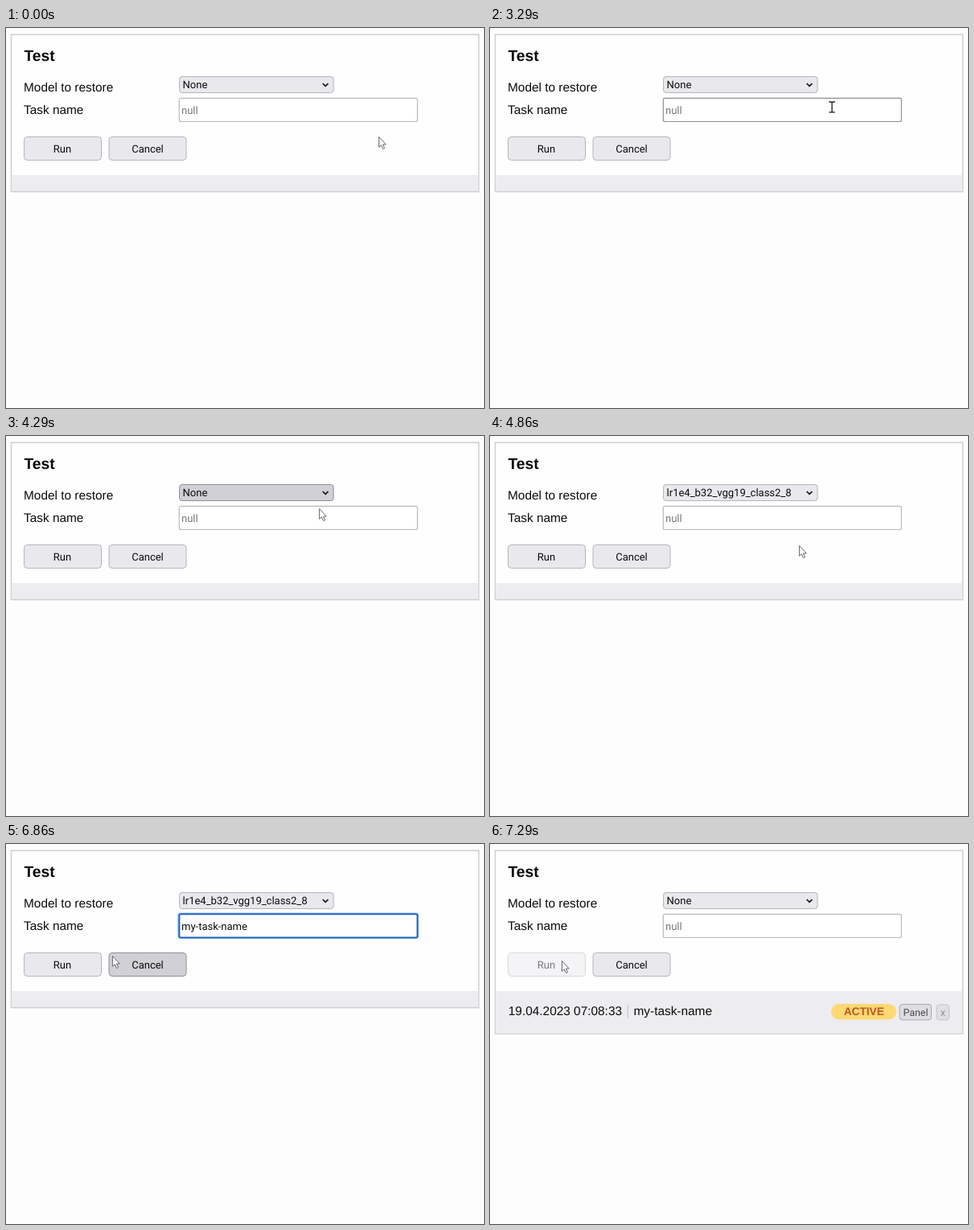
Write an HTML page that moves like this. It is 594 px wide and 473 px high and loops after 8 s.

```html
<!DOCTYPE html>
<html lang="en">
<head>
<meta charset="utf-8">
<title>Test form</title>
<style>
  html, body { margin: 0; width: 100%; height: 100%; overflow: hidden; background: #fdfdfd; }
  svg { display: block; width: 594px; height: 473px; }
  text { font: 15.4px "Liberation Sans", Arial, sans-serif; fill: #0c0c0c; text-rendering: geometricPrecision; }
  .ui { font: 13px Roboto, Tahoma, sans-serif; }
  .small { font-size: 12.4px; fill: #4a4a4e; }
  .mid { text-anchor: middle; }
  .title { font-size: 19.3px; font-weight: bold; }
  .tag { font-size: 13.7px; font-weight: bold; fill: #b9591f; }
  .control { fill: #e9e9ed; stroke: #b3b3bb; }
  .hover { fill: #d0d0d6; stroke: #8e8e98; }
  .disabled rect { fill: #f4f4f6; stroke: #d9d9de; }
  .disabled text { fill: #7b7b7f; }
</style>
</head>
<body>
<svg viewBox="0 0 594 473">
  <rect id="panel" x="6.5" y="8.2" width="581" fill="#fefefe" stroke="#cfced6" stroke-width="1.5"/>
  <rect id="footer" x="7.3" y="183" width="579.4" fill="#ededf0"/>

  <text class="title" x="22.5" y="41">Test</text>
  <text x="22" y="79">Model to restore</text>
  <text x="22" y="107">Task name</text>

  <rect id="select" class="control" x="215.5" y="60.5" width="191.5" height="20" rx="3.5"/>
  <text id="model" class="ui" x="219.6" y="75"></text>
  <path d="M393.6 69 L397 72.4 L400.4 69" fill="none" stroke="#111" stroke-width="1.7"/>

  <rect id="halo" x="212.8" y="85.3" width="300.4" height="33" rx="4" fill="#b5d2f5"/>
  <rect id="input" x="215.3" y="87.3" width="296" height="29.2" rx="2" fill="#fff"/>
  <text id="task" class="ui" x="218" y="107"></text>
  <path id="caret" d="M218.5 95 V110" stroke="#333" stroke-width="1"/>

  <g id="run">
    <rect class="control" x="22.5" y="135.5" width="96" height="29" rx="4"/>
    <text class="ui mid" x="70" y="155">Run</text>
  </g>
  <g id="cancel">
    <rect class="control" x="128" y="135.5" width="96" height="29" rx="4"/>
    <text class="ui mid" x="176" y="155">Cancel</text>
  </g>

  <g id="row">
    <text x="22.8" y="213.3">19.04.2023 07:08:33</text>
    <path d="M171.2 200 V216.5" stroke="#bdbdc2"/>
    <text x="178.5" y="213.3">my-task-name</text>
    <rect x="424" y="199" width="81" height="19.5" rx="9.75" fill="#fdd873"/>
    <text class="tag mid" x="464.8" y="213.4">ACTIVE</text>
    <rect x="509" y="199.5" width="39.5" height="19.5" rx="3.5" fill="#dedee2" stroke="#a9a9b0"/>
    <text class="ui small mid" x="529" y="214">Panel</text>
    <rect x="555" y="200" width="15.5" height="19" rx="3.5" fill="#e0e0e4" stroke="#c3c3c9"/>
    <text class="ui small mid" x="562.8" y="214" style="fill:#8f8f94">x</text>
  </g>

  <path id="arrow" d="M.4 .5 V13.4 L3.3 10.8 L5.4 15.6 L7.5 14.7 L5.4 10 H9.2 Z"
        fill="#fff" stroke="#666670" stroke-width="1"/>
  <path id="beam" d="M-3.7 -6.3 H-1 Q0 -6.3 0 -5.3 Q0 -6.3 1 -6.3 H3.7 M0 -5.5 V5.8 M-3.7 6.5 H-1 Q0 6.5 0 5.5 Q0 6.5 1 6.5 H3.7"
        fill="none" stroke="#1c1c1c" stroke-width="1.3"/>
</svg>
<script>
const LOOP = 8000;
const $ = id => document.getElementById(id);
const show = (id, on) => { $(id).style.display = on ? '' : 'none'; };

const arrow = (x, y) => ({ shape: 'arrow', x, y });
const beam = (x, y) => ({ shape: 'beam', x, y });
const MODEL = 'lr1e4_b32_vgg19_class2_8';

// Each step changes only the listed parts of the state.
const start = { at: 0, pointer: arrow(463, 135), over: '', model: 'None', task: '', focus: false, caret: false, done: false };
const steps = [
  start,
  { at: 3290, pointer: beam(425, 98.3), over: 'input' },
  { at: 3430, pointer: arrow(402, 75), over: '' },
  { at: 3710, pointer: arrow(399, 72), over: 'select' },
  { at: 3860, pointer: null },
  { at: 4000, over: '' },
  { at: 4290, pointer: arrow(389, 90), over: 'select' },
  { at: 4430, pointer: arrow(385, 103) },
  { at: 4570, pointer: arrow(381, 113) },
  { at: 4860, pointer: arrow(384, 136), over: '', model: MODEL },
  { at: 5000, pointer: beam(392, 118), over: 'input' },
  { at: 5290, pointer: beam(394, 114) },
  { at: 5430, focus: true, caret: true },
  { at: 5570, pointer: null, caret: false },
  { at: 6000, task: 'my-task-name' },
  { at: 6570, pointer: beam(394, 114) },
  { at: 6860, pointer: arrow(132, 139), over: 'cancel' },
  { at: 7000, pointer: arrow(89, 145), over: 'run' },
  { at: 7140, focus: false },
  { at: 7290, over: '', model: 'None', task: '', done: true }
];

function stateAt(t) {
  return Object.assign({}, ...steps.filter(s => s.at <= t));
}

function draw(s) {
  $('panel').setAttribute('height', s.done ? 228 : 195.5);
  $('footer').setAttribute('height', s.done ? 52.4 : 20);
  show('row', s.done);

  $('model').textContent = s.model;
  $('task').textContent = s.task || 'null';
  $('task').style.fill = s.task ? '#0c0c0c' : '#77777b';
  show('caret', s.caret);

  $('select').classList.toggle('hover', s.over === 'select');
  for (const id of ['run', 'cancel'])
    $(id).firstElementChild.classList.toggle('hover', s.over === id);
  $('run').classList.toggle('disabled', s.done);

  show('halo', s.focus);
  $('input').setAttribute('stroke', s.focus ? '#1f65c1' : s.over === 'input' ? '#8e8e98' : '#b9b9c1');
  $('input').setAttribute('stroke-width', s.focus ? 2 : 1.2);

  for (const shape of ['arrow', 'beam']) {
    const on = s.pointer && s.pointer.shape === shape;
    show(shape, on);
    if (on) $(shape).setAttribute('transform', `translate(${s.pointer.x} ${s.pointer.y})`);
  }
}

let origin = null;
function tick(now) {
  if (origin === null) origin = now;
  draw(stateAt((now - origin) % LOOP));
  requestAnimationFrame(tick);
}
draw(stateAt(0));
requestAnimationFrame(tick);
</script>
</body>
</html>
```
